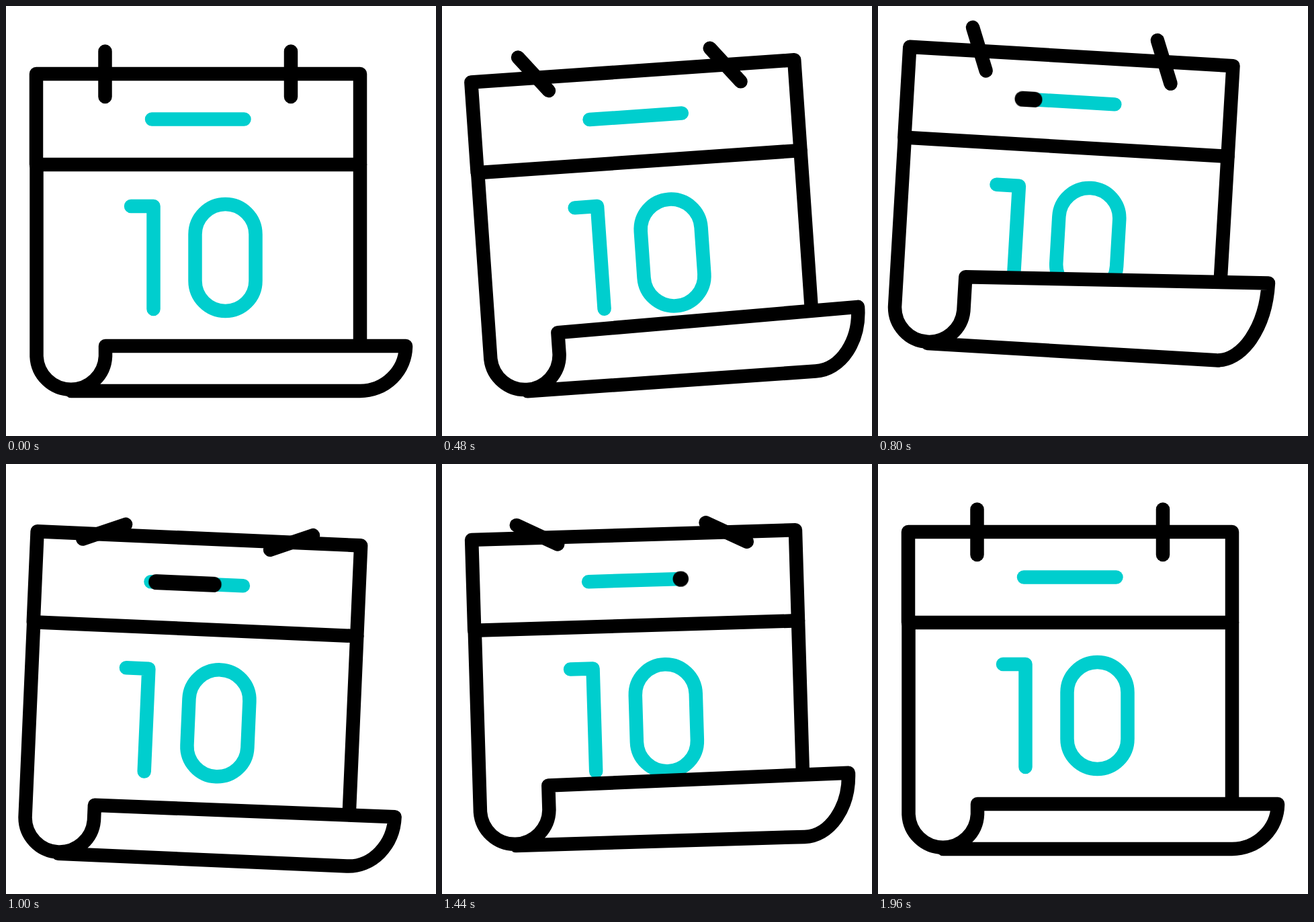
Animation of 640 by 640 pixels, one loop 3 s. Source, as an HTML page without scripts:

```html
<!DOCTYPE html>
<html lang="en">
<head>
<meta charset="utf-8">
<title>Hopping calendar</title>
<style>
  @property --tip { syntax: "<number>"; inherits: false; initial-value: 0; }
  @property --tail { syntax: "<number>"; inherits: false; initial-value: 0; }

  html, body { margin: 0; width: 100%; height: 100%; overflow: hidden; background: #fff; }
  svg { display: block; width: 100%; height: 100%; }

  svg * {
    fill: none;
    stroke: #000;
    stroke-width: 20.5px;
    stroke-linecap: round;
    stroke-linejoin: round;
    animation: 3s ease-in-out infinite;
  }
  .accent { stroke: #00cece; }

  /* whole calendar: crouch, hop, land, with a damped tilt */
  #calendar { transform-origin: 286px 133px; animation-name: hop, tilt; }
  @keyframes hop {
    0%, 60%, 100% { translate: 0 0; }
    10.5% { translate: 0 41px; }
    21.33% { translate: 0 -46px; }
    34.33% { translate: 0 10.4px; }
  }
  @keyframes tilt {
    0%, 65.33%, 100% { rotate: 0deg; }
    17.33% { rotate: -4deg; }
    29% { rotate: 4deg; }
    41.67% { rotate: -2.05deg; }
  }

  /* lower sheet: rest, sag, roll up high, roll up half as far */
  #sheet { fill: #fff; animation-name: roll; }
  @keyframes roll {
    0%, 65.33%, 100% { d: path("M45.5 236V521.5a51.3 51.5 0 0 0 102.5 0L148 506L595 506A68 67 0 0 1 527 573H97"); }
    11.2%, 34% { d: path("M45.5 236V527.5a51.3 51.5 0 0 0 102.5 0L148 505L595 503A68 76 0 0 1 527 579H97"); }
    24% { d: path("M45.5 236V481.5a51.3 51.5 0 0 0 102.5 0L148 426L599 406A72 127 0 0 1 527 533H97"); }
    54% { d: path("M45.5 236V501.5a51.3 51.5 0 0 0 102.5 0L148 462L595 456A68 97 0 0 1 527 553H97"); }
  }

  /* binder hooks; the left one also sits loosely */
  .hook { animation-name: swing; }
  .left { transform-origin: 147.5px 101px; }
  .right { transform-origin: 424px 101px; }
  @keyframes swing {
    0%, 5%, 65.33%, 100% { rotate: 0deg; }
    22.67% { rotate: -55deg; }
    33.67% { rotate: 69deg; }
    46.83% { rotate: -64deg; }
  }
  #loose { animation-name: slip; }
  @keyframes slip {
    0%, 65.33%, 100% { translate: 0 0; }
    16%, 42.67% { translate: -9.4px -6px; }
    26.67%, 54.67% { translate: 1px -3px; }
  }

  /* dark dash along the title bar: the tip leads, the tail follows */
  #runner {
    stroke-width: 23px;
    opacity: 0;
    stroke-dasharray: calc(var(--tip) - var(--tail)) 300;
    stroke-dashoffset: calc(-1 * var(--tail));
    animation-name: tip, tail, show;
    animation-timing-function: ease-in-out, ease-in-out, step-end;
  }
  @keyframes tip {
    0%, 22% { --tip: 0; }
    40.67%, 100% { --tip: 100; }
  }
  @keyframes tail {
    0%, 30.17% { --tail: 0; }
    48.83%, 100% { --tail: 100; }
  }
  @keyframes show {
    0%, 48.83%, 100% { opacity: 0; }
    22% { opacity: 1; }
  }
</style>
</head>
<body>
<svg viewBox="0 0 640 640">
  <g id="calendar">
    <path class="accent" d="M186 298H219.5V451"/>
    <rect class="accent" x="281.5" y="295" width="90" height="159" rx="45"/>
    <path d="M527 236V500"/>
    <path id="sheet" d="M45.5 236V521.5a51.3 51.5 0 0 0 102.5 0L148 506L595 506A68 67 0 0 1 527 573H97"/>
    <rect x="45" y="101" width="482" height="135"/>
    <path class="accent" d="M217 168.5H354.5"/>
    <path id="runner" pathLength="100" d="M217 168.5H354.5"/>
    <g id="loose"><path class="hook left" d="M147.5 67.5V135"/></g>
    <path class="hook right" d="M424 67.5V135"/>
  </g>
</svg>
</body>
</html>
```
